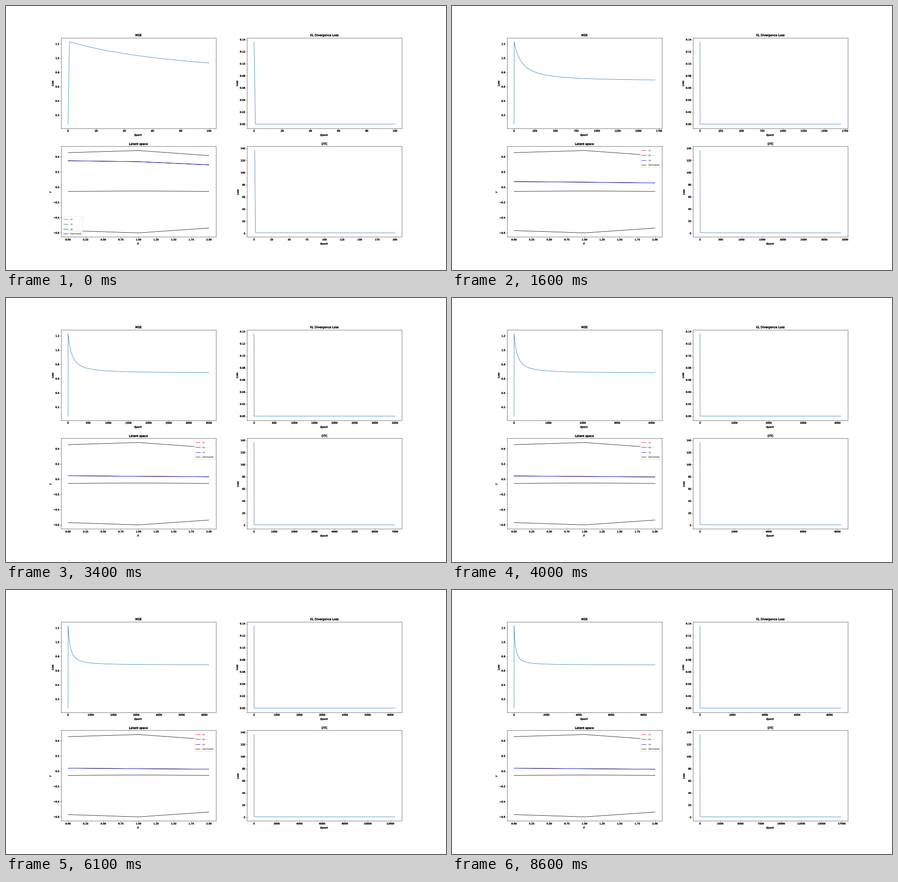
A matplotlib script that plays this animation: 966x580 px, repeating every 8700 ms.

```python
import numpy as np
import matplotlib.pyplot as plt
from matplotlib.animation import FuncAnimation
from matplotlib.patheffects import withStroke

W, H, DPI = 966, 580, 38.64
FRAMES, STEP = 87, 100

plt.rcParams.update({
    "font.family": "DejaVu Sans",
    "text.hinting": "none",
    "axes.linewidth": 1.0,
    "xtick.major.width": 1.0,
    "ytick.major.width": 1.0,
})
HEAVY = [withStroke(linewidth=0.7, foreground="black")]

# Training curves for the whole run
epochs = np.arange(FRAMES * STEP + 1)
mse = 0.681 + 0.5485 * (1 + (epochs - 1) / 133) ** -1.4
mse[0] = 0.0747
kl = np.where(epochs == 0, 0.1364, 0.0)
dtc = np.repeat(mse + 1000 * kl, 2)

CENTROIDS = [(0.4545, 0.4825, 0.4157),
             (-0.055, -0.0495, -0.055),
             (-0.570, -0.600, -0.5365)]
LATENT_START = np.array([0.348, 0.336, 0.294])
LATENT_END = np.array([0.0395, 0.0325, 0.0265])


def latent(t):
    """Encoded series after t epochs, shrinking towards its resting values."""
    power = ((1 + t / 133) / (1 + STEP / 133)) ** -0.467
    decay = power * np.exp(-(t - STEP) / 1304)
    return LATENT_END + (LATENT_START - LATENT_END) * decay


fig, axes = plt.subplots(2, 2, figsize=((W + 1e-6) / DPI, (H + 1e-6) / DPI),
                         dpi=DPI, facecolor="white")
fig.subplots_adjust(left=0.125, right=0.9, bottom=0.125, top=0.88,
                    wspace=0.2, hspace=0.2)
(ax_mse, ax_kl), (ax_lat, ax_dtc) = axes


def label(ax, title, xlabel, ylabel):
    ax.set_title(title)
    ax.set_xlabel(f"${xlabel}$")
    ax.set_ylabel(f"${ylabel}$")
    for text in (ax.title, ax.xaxis.label, ax.yaxis.label):
        text.set_path_effects(HEAVY)


label(ax_mse, "MSE", "Epoch", "Loss")
label(ax_kl, "KL Divergence Loss", "Epoch", "Loss")
label(ax_lat, "Latent space", "X", "Y")
label(ax_dtc, "DTC", "Epoch", "Loss")

line_mse, = ax_mse.plot([], [])
line_kl, = ax_kl.plot([], [])
line_dtc, = ax_dtc.plot([], [])

xs = np.arange(3)
latent_lines = [
    ax_lat.plot(xs, LATENT_START, color=c, label=f"$L_{i}$")[0]
    for i, c in enumerate(("red", "green", "blue"), 1)
]
for i, ys in enumerate(CENTROIDS):
    ax_lat.plot(xs, ys, color="black", label=None if i else "Centroids")
ax_lat.legend(loc="best")


def update(k):
    n = (k + 1) * STEP
    line_mse.set_data(epochs[:n + 1], mse[:n + 1])
    line_kl.set_data(epochs[:n + 1], kl[:n + 1])
    line_dtc.set_data(np.arange(2 * n + 1), dtc[:2 * n + 1])
    for line in latent_lines:
        line.set_ydata(latent(n))
    for ax in axes.flat:
        ax.relim()
        ax.autoscale_view()
        for tick in ax.get_xticklabels() + ax.get_yticklabels():
            tick.set_path_effects(HEAVY)
    return []


anim = FuncAnimation(fig, update, frames=FRAMES, init_func=lambda: update(0),
                     interval=100, repeat=True, repeat_delay=0, blit=False)
plt.show()
```
